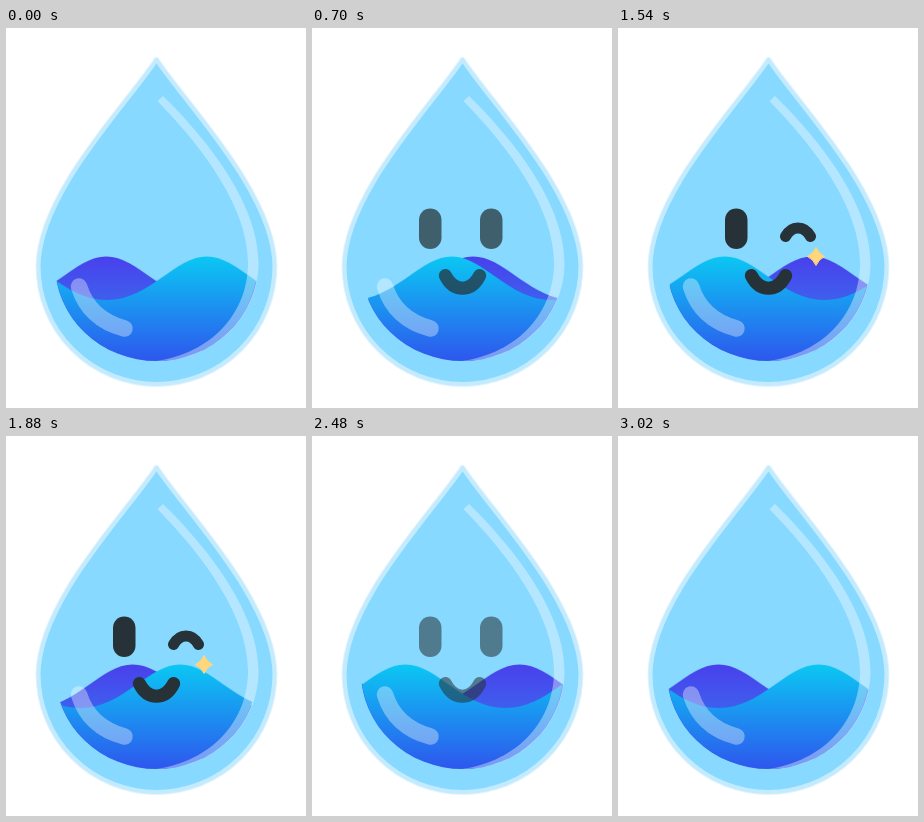
Animation, 300 px wide and 380 px high, one loop 3.04 s. Source, as an HTML page:

```html
<!DOCTYPE html>
<html lang="en">
<head>
<meta charset="utf-8">
<title>Water drop</title>
<style>
  html, body { margin: 0; width: 100%; height: 100%; overflow: hidden; background: #fff; }
  svg { display: block; width: 300px; height: 380px; }

  .wave { animation: drift 3040ms linear infinite; }
  .face { animation: fade 3040ms linear infinite; }
  .open { animation: open 3040ms step-end infinite; }
  .wink { animation: wink 3040ms step-end infinite; }

  /* three wavelengths, then a short hold before the loop restarts */
  @keyframes drift { from { transform: translateX(0); } 99.34%, to { transform: translateX(600px); } }
  @keyframes fade { 0%, 99.34%, 100% { opacity: 0; } 31.5%, 68% { opacity: 1; } }
  @keyframes open { 0%, 67% { opacity: 1; } 33% { opacity: 0; } }
  @keyframes wink { 0%, 67% { opacity: 0; } 33% { opacity: 1; } }
</style>
</head>
<body>
<svg viewBox="0 0 300 380">
  <defs>
    <linearGradient id="light" gradientUnits="userSpaceOnUse" x1="0" y1="228" x2="0" y2="333">
      <stop offset="0" stop-color="#0bc8f3"/>
      <stop offset="1" stop-color="#2e57ee"/>
    </linearGradient>
    <linearGradient id="dark" gradientUnits="userSpaceOnUse" x1="0" y1="228" x2="0" y2="285">
      <stop offset="0" stop-color="#4940ec"/>
      <stop offset="1" stop-color="#3c68ee"/>
    </linearGradient>
    <clipPath id="bowl"><ellipse cx="150.5" cy="236" rx="101.5" ry="97"/></clipPath>
    <clipPath id="bowlFront"><ellipse cx="150.3" cy="236" rx="101" ry="96.7"/></clipPath>
    <path id="drop" d="M150.5 32C121 77 33.5 165 32.5 238a118 118 0 0 0 236 0C267.5 165 180 77 150.5 32z"/>
    <path id="wave" d="M-600 228.5
      c32 0 57 43.5 100 43.5s68-43.5 100-43.5
      c32 0 57 43.5 100 43.5s68-43.5 100-43.5
      c32 0 57 43.5 100 43.5s68-43.5 100-43.5
      c32 0 57 43.5 100 43.5s68-43.5 100-43.5
      c32 0 57 43.5 100 43.5s68-43.5 100-43.5V340H-600z"/>
  </defs>

  <g stroke-linejoin="round">
    <use href="#drop" fill="none" stroke="#dff5fd" stroke-width="6"/>
    <use href="#drop" fill="#87d9ff" stroke="#c4ebfd" stroke-width="4"/>
  </g>

  <!-- the back wave mirrors the front one -->
  <g clip-path="url(#bowl)">
    <g transform="translate(300.5 0) scale(-1 1)"><use href="#wave" class="wave" fill="url(#dark)"/></g>
  </g>
  <g clip-path="url(#bowlFront)">
    <g transform="translate(.5 0)"><use href="#wave" class="wave" fill="url(#light)"/></g>
  </g>

  <path fill="#fff" fill-opacity=".38" d="M151.5 73C198 121 242 180 242 235C242 285 206 325 150 333C208 333 252.5 290 252.5 235C252.5 178 205 115 157 68z"/>
  <path fill="none" stroke="#fff" stroke-opacity=".36" stroke-width="16.5" stroke-linecap="round" d="M73 258.5Q83 291 118.5 300.500"/>

  <g class="face" fill="#263238">
    <rect x="107" y="180.5" width="22.5" height="40.5" rx="11.25"/>
    <rect class="open" x="168" y="180.500" width="22.5" height="40.5" rx="11.25"/>
    <g fill="none" stroke="#263238" stroke-linecap="round">
      <path d="M133.300 247.500C137.500 256 143 260.200 150.500 260.200S163.500 256 167.700 247.500" stroke-width="13"/>
      <path class="wink" d="M167.500 208.500C170.500 203 174.500 200 180 200S189.500 203 192.500 208.500" stroke-width="11"/>
    </g>
    <path class="wink" fill="#ffd67a" d="M198 219.500Q200.700 225.800 206.500 228.500Q200.700 231.200 198 237.500Q195.300 231.200 189.500 228.500Q195.300 225.800 198 219.500z" stroke="#ffd67a" stroke-linejoin="round"/>
  </g>
</svg>
</body>
</html>
```
